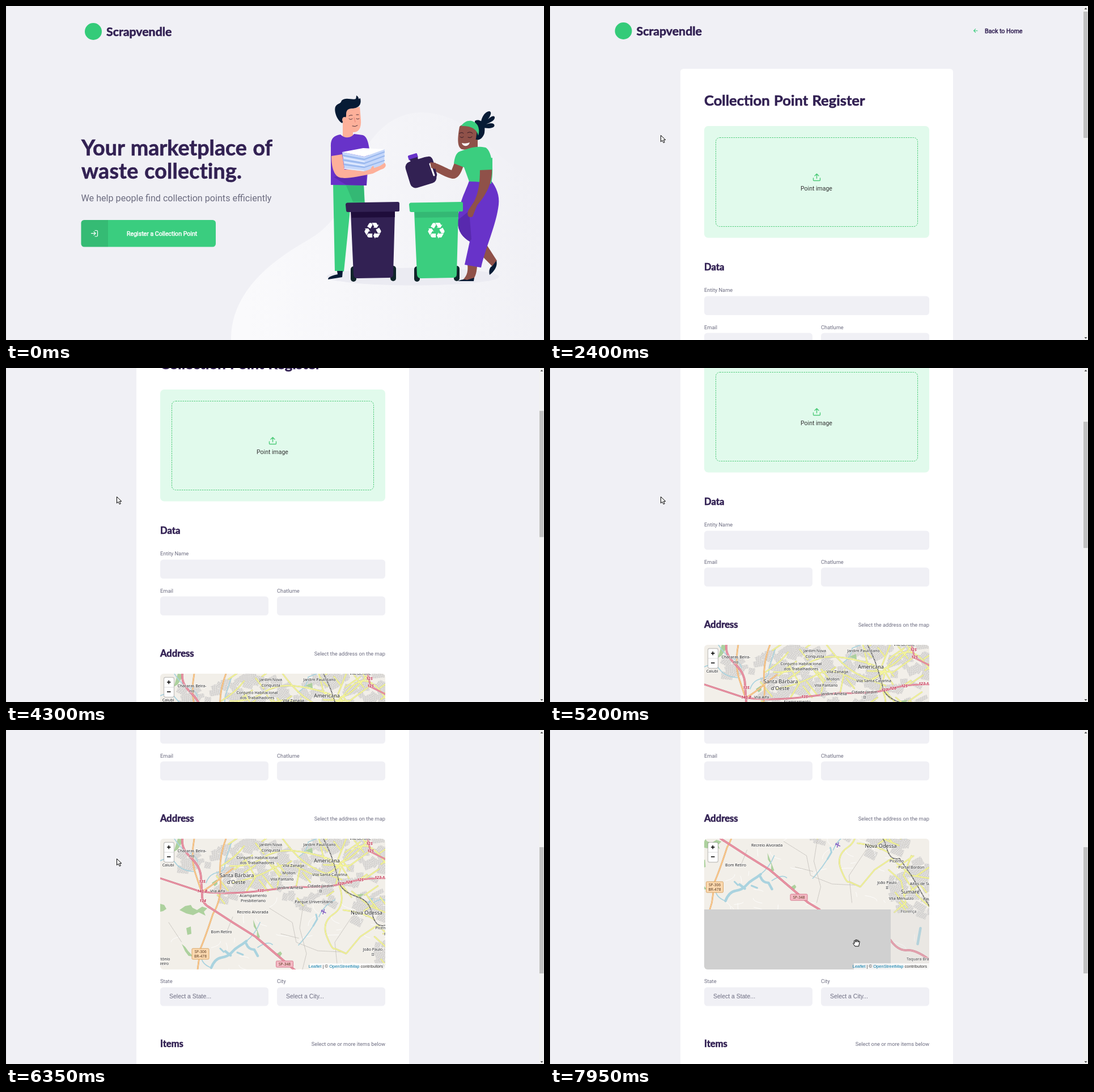
These frames come from a looping animation (949 px wide and 590 px high, 8000 ms). An HTML page:

```html
<!DOCTYPE html>
<html lang="en">
<head>
<meta charset="utf-8">
<title>Collection points</title>
<style>
html, body { margin: 0; width: 100%; height: 100%; overflow: hidden; background: #f0f0f5; }
svg { display: block; width: 949px; height: 590px; }
text { font: 9.3px Roboto, sans-serif; fill: #6c6c80; }
.title { font-family: Lato, sans-serif; font-weight: 700; fill: #322153; stroke: #322153; stroke-width: .6; word-spacing: .04em; }
.section { font-size: 16.6px; }
.bold { font-size: 10.6px; stroke-width: .5; }
.arial { font: 10.5px "Liberation Sans", Arial, sans-serif; }
.end { text-anchor: end; }
.mid { text-anchor: middle; }
.field { fill: #f0f0f5; }
.line { fill: none; stroke-linecap: round; stroke-linejoin: round; }
.dark { fill: #071b35; }
.skin { fill: #fdb09a; }
.brown { fill: #8f5149; }
.green { fill: #3bce7f; }
.purple { fill: #6833c9; }
.violet { fill: #322153; }
.cycle { font: 40px "DejaVu Sans", sans-serif; fill: #fff; text-anchor: middle; }
.place { font-family: "Noto Sans", sans-serif; text-anchor: middle; fill: #222; stroke: #fffc; stroke-width: 1.4; paint-order: stroke; }
.route { font: italic 700 7px "Noto Sans", sans-serif; text-anchor: middle; fill: #c2304e; stroke: #fffc; stroke-width: 1; paint-order: stroke; }
.sign { font: 6.6px "Noto Sans", sans-serif; text-anchor: middle; fill: #5b3a20; }
</style>
</head>
<body>
<svg viewBox="0 0 949 590">
<defs>
  <linearGradient id="haze" x1="0" y1=".6" x2="1" y2=".45">
    <stop offset="0" stop-color="#fafafc"/><stop offset="1" stop-color="#f0f0f5"/>
  </linearGradient>
  <pattern id="blocks" width="3.4" height="2.8" patternUnits="userSpaceOnUse" patternTransform="rotate(24)">
    <rect width="4" height="3" fill="#d0cecb"/><path d="M0 0H4M0 0V3" stroke="#f6f5f3" stroke-width=".9"/>
  </pattern>
  <clipPath id="frame"><rect x="272" y="192" width="397" height="231" rx="6"/></clipPath>
  <g id="wheels" fill="#10242a">
    <rect x="608" y="460" width="10" height="27" rx="5"/><rect x="678" y="459" width="10" height="27" rx="5"/>
  </g>
  <path id="lid" d="M602 347.500L691 346Q694 346 694 349V361Q694 363 691 363L603 364Q600 364 600 361L599 351Q599 348 602 347.500Z"/>
  <path id="bin" d="M608 363H686L683 474Q683 480 676 480L620 481Q614 481 613 475Z"/>
</defs>

<rect width="949" height="590" fill="#f0f0f5"/>

<g id="home">
  <path fill="url(#haze)" d="M397 590C396 510 460 455 530 415C592 380 598 335 614 295C637 232 676 190 730 188C800 188 838 236 876 268C908 294 930 300 949 333V590Z"/>
  <circle cx="154" cy="45" r="15" fill="#34cb79"/>
  <text class="title" x="177" y="53" style="font-size:21.3px">Scrapvendle</text>
  <text class="title" x="133" y="263.500" style="font-size:37.6px">Your marketplace of</text>
  <text class="title" x="133" y="304.500" style="font-size:37.6px;letter-spacing:.2px">waste collecting.</text>
  <text x="132.500" y="344.500" style="font-size:16.15px">We help people find collection points efficiently</text>
  <rect id="button" x="132.500" y="378" width="237.500" height="47.500" rx="5.500"/>
  <path d="M138 378H180V425.500H138Q132.500 425.500 132.500 420V383.500Q132.500 378 138 378Z" opacity=".09"/>
  <path class="line" stroke="#fff" stroke-width="1.200" d="M157 396.500H160Q161.500 396.500 161.500 398V405.500Q161.500 407 160 407H157M150.500 401.700H158M155 398.700L158 401.700 155 404.700"/>
  <text class="bold" x="213" y="405.500" style="fill:#fff;stroke:#fff">Register a Collection Point</text>

  <ellipse cx="718" cy="478" rx="152" ry="15.500" fill="#ebebf2"/>
  <!-- man -->
  <path class="green" d="M577 314H631L633 350H608L596 469 580 468Z"/>
  <path fill="#34b874" d="M600 317H631L632 346H612Z"/>
  <path class="dark" d="M584 468H594L593 479 568 483C568 478 576 476 585 474Z"/>
  <path class="skin" d="M594 196H612V234H594Z"/>
  <path class="purple" d="M590 227C598 235 609 233 614 226L629 228C636 230 639 239 641 253L636 317 573 316V250C572 234 578 229 590 227Z"/>
  <path fill="#5a2bb2" d="M578 302L634 292 636 317 600 316Z"/>
  <path class="skin" d="M597 183Q610 182 624 178L626 201C627 216 622 223 613 223C602 222 597 210 597 200Z"/>
  <path class="dark" d="M593 207C585 203 578 187 581 178C585 171 590 174 592 167C599 160 612 167 617 164Q618 161 618 158Q622 160 622 164L625 163Q628 176 617 180C610 182 606 180 602 184C598 189 602 195 598 198Z"/>
  <ellipse class="skin" cx="597" cy="201" rx="4" ry="5"/>
  <path class="line" stroke="#3b2430" stroke-width=".9" d="M605 194Q608 192 611 193M618 192L622 192M605 199Q608 202 611 199M618 199Q620 201 623 199M611 212Q616 214 620 211"/>
  <path class="line" stroke="#ea8d7d" stroke-width="1.200" d="M614 197L616 205"/>
  <path class="skin" d="M574 265L593 262 597 289 641 288 666 276C673 280 670 287 661 289L647 296C622 301 600 306 589 303C578 300 574 283 574 265Z"/>
  <path fill="#c5d7fa" d="M593 258L632 266 668 253 667 280 632 292 597 288Z"/>
  <path class="line" stroke="#99b8ee" stroke-width="2.300" d="M595 264L632 271 667 258M595 272L632 278 667 265M597 280L632 285 667 273"/>
  <path class="line" stroke="#eaf1ff" stroke-width="1.500" d="M596 268L632 275M597 276L632 282M597 287L631 291"/>
  <path fill="#fff" d="M593 258L630 251 668 253 632 266Z"/>
  <path class="skin" d="M643 291Q643 285 648 282L650 289 668 277Q672 283 662 288L647 294Z"/>
  <!-- bins -->
  <use href="#wheels"/><use href="#wheels" x="112"/>
  <use href="#bin" class="violet"/>
  <path fill="#1f0d3b" d="M609 363H686V373L610 374Z"/>
  <use href="#lid" class="violet"/>
  <text class="cycle" x="647" y="410.500">♻</text>
  <!-- woman -->
  <path class="brown" d="M848 422L866 450 858 460 836 438Z"/>
  <path class="dark" d="M865 450C868 460 860 470 853 475C851 466 854 461 858 459Z"/>
  <path class="brown" d="M814 456L831 460C830 473 827 482 820 486H803C811 480 816 472 814 456Z"/>
  <path class="dark" d="M797 486Q807 481 813 484L826 480 825 486Z"/>
  <path class="purple" d="M817 309H856C865 320 871 335 869 351C865 386 846 426 838 462L809 457 818 416C806 409 797 398 797 382C798 348 808 334 817 309Z"/>
  <path fill="#5829ae" d="M797 378L817 362 821 412 818 416C806 409 797 398 797 382Z"/>
  <path class="dark" d="M827 203C836 198 847 207 844 224C842 233 834 239 827 236ZM838 211C836 200 845 185 853 186C859 188 852 199 846 205C855 193 863 192 862 198C861 203 853 206 847 209C855 206 864 207 861 213C855 218 846 215 840 215Z"/>
  <path class="brown" d="M815 236H832V254H812Z"/>
  <path class="brown" d="M800 213C796 235 796 249 804 253C817 256 827 249 829 234L831 220C824 207 808 205 800 213Z"/>
  <path class="green" d="M803 212C810 201 824 199 832 211Q836 219 833 229Q829 211 803 212Z"/>
  <path class="line" stroke="#301925" stroke-width="1" d="M800 225Q804 222 807 225M814 224Q819 221 823 225M801 231Q804 234 807 231M815 232Q819 234 822 231"/>
  <path fill="#fff" d="M804 242Q811 244 818 241Q816 248 809 247Q805 246 804 242Z"/>
  <path class="brown" d="M791 277L807 282C802 298 796 306 787 305C773 302 759 293 748 286L747 279 751 276C766 279 777 287 786 290Z"/>
  <path class="green" d="M803 256C815 252 828 246 846 250C857 256 861 286 856 314Q838 310 817 310L808 285 790 278C792 264 795 258 803 256Z"/>
  <path class="brown" d="M836 288L857 289C858 316 844 337 831 352L823 372C815 376 812 368 816 360L826 345C834 329 836 310 836 288Z"/>
  <path class="green" d="M834 275L858 268V289L835 290Z"/>
  <path class="line" stroke="#322153" stroke-width="4.500" d="M738 270L746 268Q750 268 752 276L758 298Q758 303 750 305"/>
  <g transform="rotate(-17 732 294)">
    <rect class="violet" x="708" y="270" width="48" height="48" rx="10"/>
    <rect class="purple" x="718" y="259" width="17" height="9" rx="2"/>
    <rect class="violet" x="720" y="266" width="14" height="6"/>
  </g>
  <path class="line" stroke="#fff" stroke-width="3" d="M748 279L755 299"/>
  <path class="brown" d="M748 276L758 277 757 288 750 286Z"/>
  <use href="#bin" class="green" x="112"/>
  <path fill="#34b874" d="M721 363H798V373L722 374Z"/>
  <use href="#lid" class="green" x="112"/>
  <text class="cycle" x="759" y="410.500">♻</text>
</g>

<g id="status">
  <path fill="#dcdfe3" d="M0 577H130Q133 577 133 580V590H0Z"/>
  <text x="4" y="587.500" style="font:9.6px 'Noto Sans',sans-serif;fill:#444b52">localhost:3000/create-point</text>
</g>

<g id="form">
  <g id="page">
    <circle cx="129.500" cy="44" r="15" fill="#34cb79"/>
    <text class="title" x="152.500" y="52" style="font-size:21.3px">Scrapvendle</text>
    <path class="line" stroke="#34cb79" stroke-width="1.100" d="M754 43.700H747.500M750.500 40.700L747.500 43.700 750.500 46.700"/>
    <text class="bold" x="767" y="47.500" style="fill:#322153;stroke:#322153">Back to Home</text>
    <rect x="230" y="111" width="481" height="1400" rx="5.500" fill="#fff"/>
    <text class="title" x="272" y="175.500" style="font-size:25.6px">Collection Point Register</text>
    <rect x="272" y="212" width="397" height="197.500" rx="7" fill="#e1faec"/>
    <rect x="292.500" y="232.500" width="356" height="157" rx="7" fill="none" stroke="#4ecb79" stroke-dasharray="2.500 1.500"/>
    <path class="line" stroke="#4ecb79" stroke-width="1.400" d="M464.500 304V307.500Q464.500 308.500 465.500 308.500H475.500Q476.500 308.500 476.500 307.500V304M470.500 304.500V296.500M467 300L470.500 296.500 474 300"/>
    <text class="mid" x="470" y="325.500" style="font-size:10.5px;fill:#333">Point image</text>

    <text class="title section" x="272" y="467">Data</text>
    <text x="272" y="505.300">Entity Name</text>
    <rect class="field" x="272" y="512.500" width="397" height="33.500" rx="5.500"/>
    <text x="272" y="570.500">Email</text><text x="478" y="570.500">Chatlume</text>
    <rect class="field" x="272" y="577.500" width="191" height="33.500" rx="5.500"/>
    <rect class="field" x="478" y="577.500" width="191" height="33.500" rx="5.500"/>

    <text class="title section" x="272" y="684">Address</text>
    <text class="end" x="669" y="681.500">Select the address on the map</text>
    <g transform="translate(0 522)"><g clip-path="url(#frame)">
      <g id="map">
        <rect x="200" y="100" width="600" height="500" fill="#f2efe9"/>
        <g id="town"></g>
        <path fill="#add19e" d="M306 318L316 311 326 309 329 314 337 318 346 312 355 315 349 321 352 328 340 322 330 327 318 324ZM272 307L279 309 283 316 277 320 272 321ZM303 192L313 193 308 203 303 211 296 215 299 205ZM318 350L326 347 327 360 320 362ZM436 335L442 350 448 366 442 370 443 356 437 347ZM310 378L316 383 321 390 330 400 322 399 316 391ZM475 397L484 391 487 395 482 402ZM363 270L372 264 373 272 368 276ZM528 213L540 208 541 218ZM610 292L632 289 624 296Z"/>
        <g class="line" stroke="#aad3df">
          <path stroke-width="4.500" d="M362 420Q368 404 380 402T398 393 411 382 424 373M387 391L396 398M424 378Q428 388 438 388L444 399M706 468L701 496"/>
          <path stroke-width="3" d="M378 386L384 392M408 393L418 397M547 326L549 334 542 346M646 298L640 305"/>
          <path stroke-width="1.700" d="M297 192Q310 212 322 216T338 232M272 231Q290 222 299 235T331 250M353 270Q358 255 372 252T386 240 398 198M515 225Q532 214 533 198L548 192M362 420Q340 412 345 390M444 384Q462 372 470 379M424 373Q440 360 448 340M542 346Q530 365 516 380M580 300Q560 310 552 330M648 305Q668 292 680 310"/>
        </g>
        <g class="line" stroke="#bfbcb7" stroke-width=".8" stroke-dasharray="2 1">
          <path d="M525 305L518 350 530 395 523 423M465 315L505 340 512 375 550 390 590 392M400 330L390 355M485 360L517 368M287 340L310 375M610 330L580 375 585 423"/>
        </g>
        <g id="roads" class="line"></g>
        <g id="names"></g>
        <rect x="328" y="386" width="30" height="19" rx="1.500" fill="#fbd9b0" stroke="#d9a565"/>
        <text class="sign" x="343" y="393.600">SP-306</text><text class="sign" x="343" y="402">BR-478</text>
        <rect x="476.500" y="408" width="30" height="11" rx="1.500" fill="#f4b9c4" stroke="#d5788c"/>
        <text class="sign" x="491.500" y="415.800">SP-348</text>
        <path class="line" stroke="#8461c4" stroke-width="1.500" d="M556.500 319L564 323M561.500 317L559 325M557.500 318L556.500 321"/>
        <rect x="200" y="435" width="453.500" height="160" fill="#d0d0d0"/>
        <rect id="tile" x="653.500" y="435" width="150" height="160" fill="#d0d0d0"/>
      </g>
      <rect x="278.500" y="198.500" width="18" height="35" rx="3" fill="#fff" stroke="#0003" stroke-width="1.400"/>
      <path d="M279 216H296" stroke="#ccc" stroke-width=".7"/>
      <path d="M284 207H290.500M287.250 203.800V210.200M284 224H290.500" stroke="#000" stroke-width="1.500"/>
      <rect x="536" y="412" width="133" height="11" fill="#fffb"/>
      <text class="arial end" x="665" y="419.700" style="font-size:7.550px;fill:#333"><tspan fill="#0078a8">Leaflet</tspan> | © <tspan fill="#0078a8">OpenStreetMap</tspan> contributors</text>
    </g></g>

    <text x="272" y="969">State</text><text x="478" y="969">City</text>
    <rect class="field" x="272" y="976.500" width="191" height="33" rx="5.500"/>
    <rect class="field" x="478" y="976.500" width="191" height="33" rx="5.500"/>
    <text class="arial" x="288" y="995.500">Select a State...</text>
    <text class="arial" x="494" y="995.500">Select a City...</text>
    <text class="title section" x="272" y="1082">Items</text>
    <text class="end" x="669" y="1079.500">Select one or more items below</text>
  </g>
  <rect x="940" width="9" height="590" fill="#f1f1f1"/>
  <rect id="thumb" x="941" y="10" width="7.500" height="223" fill="#c1c1c1"/>
  <path fill="#505050" d="M942.500 6L945 3 947.500 6ZM942.500 585L945 588 947.500 585Z"/>
</g>

<rect width="1" height="590" fill="#e3e3e8"/>

<g id="cursor" fill="#fff" stroke="#000" stroke-linejoin="round">
  <path d="M.5.5V11.800L3.200 9.300 5.200 13.600 7.200 12.700 5.300 8.500H8.800Z"/>
  <path d="M1.500 9.500L.8 5Q1 3 2.800 3.500Q2.800 1.300 4.500 1.800Q5.500.6 6.600 1.700Q8 1 8.800 2.200Q10.800 2 10.600 4L10 9.500Z"/>
  <path d="M4 12.500L.8 8Q.5 6.200 2.500 7L3.300 7.800 2.300 3Q3 1.300 4.200 2.600L5 5.200 5 1.400Q6 .2 7 1.400L7.200 5 8 1.800Q9.200.8 9.800 2.200L9.600 5.500 10.600 3.600Q12 3 12.200 4.400L10.600 12.500Z"/>
</g>
</svg>

<script>
const byId = id => document.getElementById(id);

let seed = 7;
const random = () => (seed = seed * 16807 % 2147483647) / 2147483647;

function add(parent, tag, attributes, content = "") {
  const node = document.createElementNS("http://www.w3.org/2000/svg", tag);
  for (const key in attributes) node.setAttribute(key, attributes[key]);
  node.textContent = content;
  parent.append(node);
}

function road(d, casing, fill, width) {
  add(byId("roads"), "path", { d, stroke: casing, "stroke-width": width + .7 });
  add(byId("roads"), "path", { d, stroke: fill, "stroke-width": width });
}

// Built-up areas: centre, radii, number of blocks, number of avenues
const districts = [
  [590, 225, 85, 50, 85, 18], [425, 235, 75, 45, 70, 12], [640, 312, 32, 28, 26, 4],
  [692, 395, 45, 50, 45, 6], [318, 225, 22, 25, 10, 0], [525, 295, 45, 16, 16, 2], [375, 285, 30, 12, 8, 1]
];
let avenues = "";
for (const [cx, cy, rx, ry, blocks, streets] of districts) {
  const spot = () => {
    const angle = random() * 6.283, reach = Math.sqrt(random());
    return [cx + Math.cos(angle) * rx * reach, cy + Math.sin(angle) * ry * reach];
  };
  for (let i = 0; i < blocks; i++) {
    const [x, y] = spot();
    add(byId("town"), "rect", {
      x, y, width: 9 + random() * 14, height: 7 + random() * 9,
      fill: "url(#blocks)", transform: `rotate(${random() * 70 - 35} ${x} ${y})`
    });
  }
  for (let i = 0; i < streets; i++) {
    const turn = i % 2 ? -.6 : .9, length = 14 + random() * 22;
    avenues += `M${spot()}l${length * Math.cos(turn)} ${length * Math.sin(turn)}`;
  }
}
for (let i = 0; i < 45; i++) {
  const x = 272 + random() * 440, y = 310 + random() * 190;
  const dx = random() * 50 - 25, dy = random() * 40 - 20;
  add(byId("town"), "path", {
    d: `M${x} ${y}q${dx} ${dy / 3} ${dx} ${dy}`, fill: "none", stroke: "#fff", "stroke-width": .8
  });
}

road(avenues + "M395 240Q430 242 455 225T520 215 580 232 640 192M400 270Q445 260 470 245T530 250 600 225 669 235M488 192Q510 222 530 236T592 264M420 225L440 260 425 284M552 192L560 225 590 245 582 272M600 192L585 230 605 262M640 215L606 240 560 238M380 240Q405 225 420 205M460 230L482 258 478 280M520 236L512 276M588 275Q600 310 578 325T566 365 580 386L600 395 625 365 655 345 690 375 722 380M595 318Q630 322 650 335M650 365L672 385 680 423 660 440M690 340L676 375 700 410 722 430M610 285L640 310 668 322", "#c9c878", "#f5f69b", 1.8);
road("M332 192Q326 225 333 250L345 286M388 192Q375 225 378 262T365 325Q352 365 343 386L338 423 330 450M345 286Q362 276 378 262L400 245", "#d69b56", "#fbc98f", 1.9);
road("M311 192C308 225 343 225 344 262L346 292Q345 306 360 314L400 340 440 365 508 423 528 435M653 489Q666 508 682 507T722 524", "#c9627c", "#e892a2", 3);
road("M272 262L345 286Q395 291 450 284L510 277Q570 279 600 270T669 262M638 192L643 215 669 228", "#c9627c", "#e892a2", 2.2);
const railway = "M560 192Q572 215 578 235T588 270 620 295Q640 300 646 325T669 345L690 375 722 430";
road(railway, "#555", "#666", .8);
add(byId("roads"), "path", { d: railway, stroke: "#ddd", "stroke-width": .7, "stroke-dasharray": "3 3" });

function label(kind, size, list) {
  for (const [name, x, y] of list)
    add(byId("names"), "text", { class: kind, x, y: y + size * .35, style: `font-size:${size}px` }, name);
}
label("route", 7, [["125", 641, 201], ["125", 643, 214], ["135", 346, 268], ["140-B", 346, 285], ["134", 347, 302], ["135", 449, 284], ["127", 590, 272], ["126", 605, 269], ["125", 625, 265], ["123-12", 661, 261]]);
label("place", 9.1, [["Santa Bárbara", 407, 257], ["d'Oeste", 406, 269], ["Americana", 566, 231], ["Nova Odessa", 636, 323], ["Sumaré", 688, 404]]);
label("place", 7, [
  ["Jardim Nova", 467, 203], ["Conquista", 467, 213], ["Jardim Paulistano", 553, 203], ["Vila Bertine", 625, 192],
  ["Chácaras Beira-", 328, 214], ["rio", 328, 223], ["Caiubi", 286, 239], ["Conjunto Habitacional", 443, 226],
  ["dos Trabalhadores", 443, 235], ["Vila Zanaga", 507, 240], ["Mollon", 499, 253], ["Vila Pantano", 487, 264],
  ["Vila Santa Catarina", 571, 256], ["Cidade Jardim", 555, 276], ["II", 555, 285], ["Jardim Amélia", 501, 279],
  ["Vila Alfa", 373, 285], ["Acampamento", 436, 293], ["Presbiteriano", 436, 302], ["Parque Universitário", 543, 304],
  ["Recreio Alvorada", 435, 322], ["Bom Retiro", 380, 357], ["tônio", 281, 405], ["zeiro", 279, 413],
  ["João Paulo", 647, 388], ["II", 647, 397], ["Picerno", 664, 350], ["Portal Bordon", 690, 361],
  ["Altos de Sumaré", 714, 390], ["Vila Menuzzo", 672, 416], ["Paulista", 724, 417], ["Florença", 685, 439], ["Taquara Branca", 707, 523]
]);

// Each row holds from its time until the next one: [ms, values...]
const ARROW = 0, FIST = 1, HAND = 2;
const pointer = [
  [0, -50, -50, ARROW], [500, 330, 560, ARROW], [600, 318, 515, ARROW], [700, 301, 470, ARROW], [850, 285, 432, ARROW],
  [950, 275, 413, ARROW], [1050, 267, 408, ARROW], [1200, 262, 406, ARROW], [1500, 260.500, 404.500, ARROW],
  [1800, 254, 388, ARROW], [1950, 238, 345, ARROW], [2100, 217, 290, ARROW], [2250, 202, 245, ARROW],
  [2400, 195, 228, ARROW], [2550, 195, 227, ARROW],
  [6500, 270, 262, ARROW], [6650, 360, 306, HAND], [6800, 428, 340, HAND], [6950, 444, 345.500, FIST],
  [7150, 428, 312, FIST], [7350, 402, 252, FIST], [7550, 391.500, 228, FIST], [7750, 470, 310, HAND], [7950, 534, 369.500, HAND]
];
const scrolling = [
  [0, 0], [3600, 16], [3800, 62], [3950, 102], [4150, 144], [4300, 174], [4500, 196], [4700, 204],
  [5200, 225], [5350, 300], [5550, 378], [6000, 420], [6150, 474], [6300, 522]
];
const dragging = [[0, 0, 0], [7150, -16, -34], [7350, -42, -94], [7550, -52.500, -118]];
const loading = [[0, 1], [7950, .25]];
const hold = (rows, t) => rows.findLast(row => row[0] <= t).slice(1);

const HOVER = 950, OPEN = 1800;
const mix = (a, b, k) => a.map((v, i) => Math.round(v + (b[i] - v) * k));
const show = (node, on) => { node.style.display = on ? "" : "none"; };

function render() {
  const t = performance.now() % 8000;
  const [x, y, shape] = hold(pointer, t);
  const [top] = hold(scrolling, t);
  const hover = Math.min(1, Math.max(0, (t - HOVER) / 200));

  show(byId("home"), t < OPEN);
  show(byId("form"), t >= OPEN);
  show(byId("status"), t >= 1050 && t < OPEN);
  byId("button").setAttribute("fill", `rgb(${mix([58, 205, 127], [52, 183, 115], hover)})`);
  byId("page").setAttribute("transform", `translate(0 ${-top})`);
  byId("thumb").setAttribute("y", 10 + top / 2.65);
  byId("map").setAttribute("transform", `translate(${hold(dragging, t)})`);
  byId("tile").setAttribute("opacity", hold(loading, t)[0]);
  byId("cursor").setAttribute("transform", `translate(${x} ${y})`);
  [...byId("cursor").children].forEach((path, i) => show(path, i === shape));
  requestAnimationFrame(render);
}
render();
</script>
</body>
</html>
```
